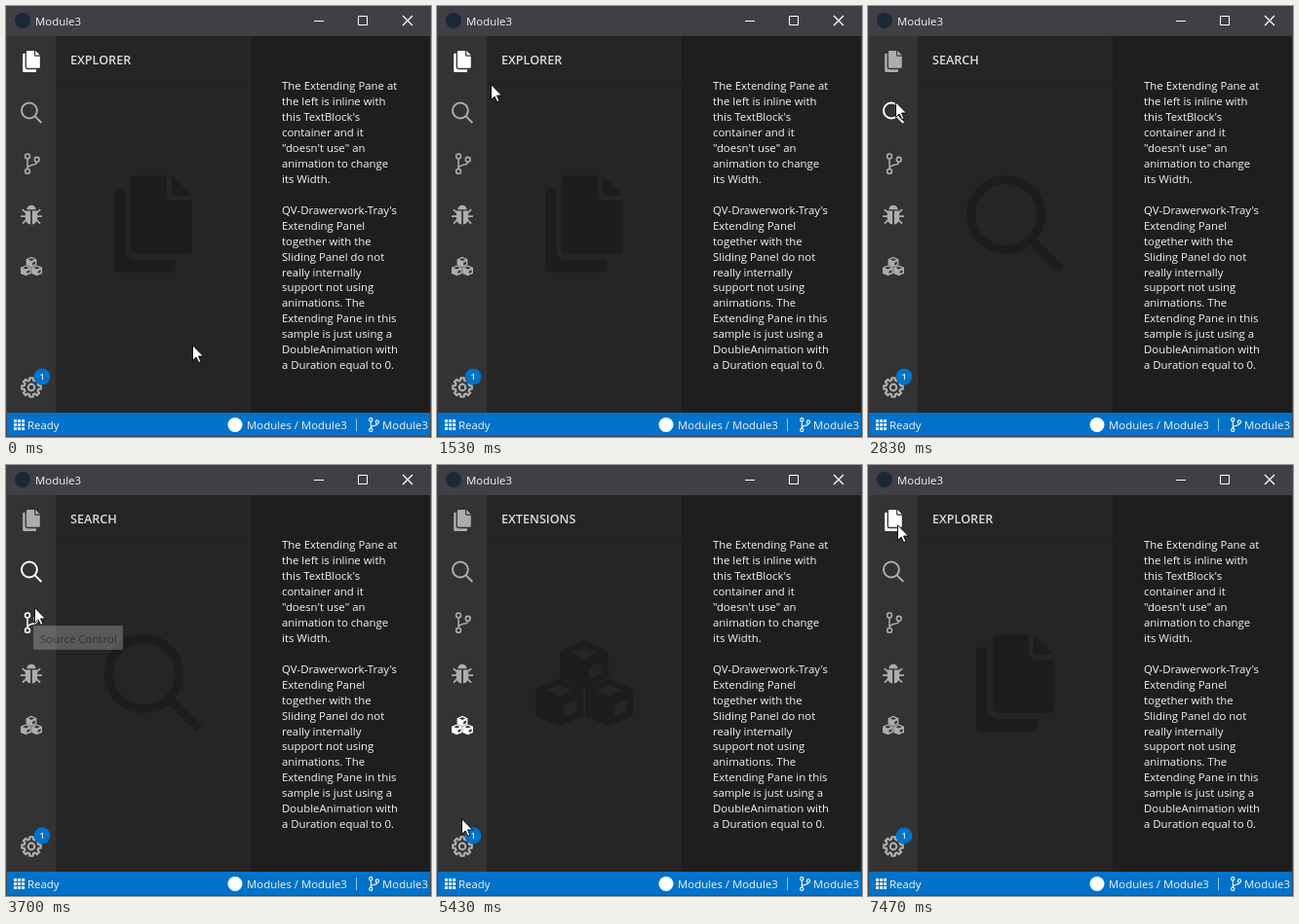
An HTML page for the animation above (8 s loop, 436x443 px).

```html
<!DOCTYPE html>
<html lang="en">
<head>
<meta charset="utf-8">
<title>Navigation pane</title>
<style>
  html, body { margin: 0; width: 100%; height: 100%; overflow: hidden; background: #1e1e1e; }
  svg { display: block; width: 436px; height: 443px; }
  text { font: 500 11.4px "Open Sans", "Noto Sans", sans-serif; fill: #f4f4f4; white-space: pre; }
  #title { font-weight: 600; font-size: 12.6px; fill: #dcdcdc; }
  .item { color: #adadad; }
  .item.lit { color: #fff; }
  .fill { fill: currentColor; fill-rule: evenodd; }
  .line { fill: none; stroke: currentColor; stroke-width: 8; stroke-linejoin: round; }
</style>
</head>
<body>
<svg viewBox="0 0 436 443">
  <defs>
    <linearGradient id="under" x2="0" y2="1"><stop stop-opacity=".14"/><stop offset="1" stop-opacity="0"/></linearGradient>

    <!-- icons share a 100 unit box -->
    <g id="files" class="fill">
      <path d="M10 18a5 5 0 0 1 5-5H21V76a11 11 0 0 0 11 11H73V95a5 5 0 0 1-5 5H15a5 5 0 0 1-5-5Z"/>
      <path d="M27 5a5 5 0 0 1 5-5H64V20a6 6 0 0 0 6 6H90V76a5 5 0 0 1-5 5H32a5 5 0 0 1-5-5Z"/>
      <path d="M69 0L90 21H73a4 4 0 0 1-4-4Z"/>
    </g>
    <g id="search" class="line" style="stroke-width:9">
      <circle cx="40.5" cy="40.5" r="36"/>
      <path d="M66 66L97 97"/>
    </g>
    <g id="branch" class="line" style="stroke-width:7">
      <circle cx="32" cy="15" r="11"/><circle cx="32" cy="85" r="11"/><circle cx="76" cy="30" r="11"/>
      <path d="M32 26V74M76 41C76 62 34 48 32 72"/>
    </g>
    <g id="bug">
      <path class="fill" d="M29 25a21 21 0 0 1 42 0ZM22 31H46V94C30 92 22 80 22 66ZM54 31H78V66C78 80 70 92 54 94Z"/>
      <path class="line" d="M26 40L8 24M74 40L92 24M24 56H0M76 56H100M27 72L9 90M73 72L91 90"/>
    </g>
    <path id="cube" class="fill" d="M0-24.5L24.5-14V14L0 24.5L-24.5 14V-14ZM0-18L14-12L0-6L-14-12ZM5 3L18-3V9L5 15Z"/>
    <g id="cubes">
      <use href="#cube" x="50" y="31"/><use href="#cube" x="24.5" y="70"/><use href="#cube" x="75.5" y="70"/>
    </g>
    <g id="gear" class="line" style="stroke-width:10"><path id="teeth"/><circle cx="50" cy="50" r="15"/></g>
  </defs>

  <rect width="436" height="443" fill="#1e1e1e"/>
  <rect width="436" height="31" fill="#403f46"/>
  <rect y="31" width="51" height="387" fill="#333"/>
  <rect x="51" y="31" width="200" height="387" fill="#252526"/>
  <rect x="51" y="78" width="200" height="3" fill="url(#under)"/>
  <rect y="418" width="436" height="25" fill="#0072c9"/>
  <path d="M.5 0V442.5H435.5V0" fill="none" stroke="#48474e"/>

  <circle cx="17" cy="15" r="8" fill="#172a35"/>
  <text x="30" y="20">Module3</text>
  <g fill="none" stroke="#fff">
    <path d="M316 15.5H326M361.5 10.5H370.5V19.5H361.5Z"/>
    <path d="M407 10L417 20M417 10L407 20" stroke-width="1.3"/>
  </g>

  <text id="title" x="66" y="60"></text>
  <use id="mark" transform="translate(101 174)" color="#1d1d1d"/>
  <g id="body"></g>
  <g id="items"></g>
  <circle cx="37" cy="381" r="8.4" fill="#0072c9"/>
  <text x="37" y="384.3" text-anchor="middle" style="font-size:9px;font-weight:600">1</text>

  <g id="dots" fill="#fff"></g>
  <text x="22" y="435">Ready</text>
  <circle cx="235" cy="430.5" r="7.5" fill="#fff"/>
  <text x="247" y="435">Modules / Module3</text>
  <path d="M359.5 424V437" stroke="#fff" stroke-opacity=".6"/>
  <use href="#branch" transform="translate(369.5 423) scale(.15)" color="#fff"/>
  <text x="386" y="435">Module3</text>

  <g id="tip" opacity="0">
    <rect x="28.5" y="165.5" width="91" height="24" fill="#f1f2f7" stroke="#ddd"/>
    <text x="35" y="183" style="fill:#444">Source Control</text>
  </g>
  <path id="cursor" d="M.5 .8V16.4L4.1 13L6.7 18.6L9 17.6L6.5 12H11.5Z" fill="#fff" stroke="#000" stroke-width=".9"/>
</svg>
<script>
const LOOP = 8000;
const START = { x: 191, y: 348 };

// each move glides from the last resting point
const MOVES = [
  { from: 30, to: 370, x: 214, y: 313 },
  { from: 770, to: 1570, x: 50, y: 73 },
  { from: 1570, to: 1900, x: 41, y: 66 },
  { from: 2070, to: 2470, x: 30, y: 88 },
  { from: 2470, to: 2640, x: 28, y: 111 },
  { from: 2720, to: 2870, x: 28, y: 94 },
  { from: 3170, to: 3300, x: 29, y: 146 },
  { from: 3960, to: 4230, x: 27, y: 224 },
  { from: 4600, to: 4870, x: 27, y: 263 },
  { from: 5130, to: 5530, x: 25, y: 388 },
  { from: 5900, to: 6270, x: 26, y: 135 },
  { from: 6270, to: 6670, x: 28, y: 49 },
  { from: 6740, to: 7030, x: 29, y: 60 },
  { from: 7440, to: 7470, x: 30, y: 61 }
];

// a click opens the item under the pointer
const CLICKS = [2670, 3920, 4590, 5120, 5890, 6730];
const TIP = { from: 3650, to: 3920, fade: 200 };

const ITEMS = ["files", "search", "branch", "bug", "cubes", "gear"];
const TITLES = ["EXPLORER", "SEARCH", "SOURCE CONTROL", "DEBUG", "EXTENSIONS", "SETTINGS"];
const itemY = i => ITEMS[i] === "gear" ? 392 : 57 + 52.6 * i;

const LINES = `The Extending Pane at
the left is inline with
this TextBlock's
container and it
"doesn't use" an
animation to change
its Width.

QV-Drawerwork-Tray's
Extending Panel
together with the
Sliding Panel do not
really internally
support not using
animations. The
Extending Pane in this
sample is just using a
DoubleAnimation with
a Duration equal to 0.`.split("\n");

const $ = id => document.getElementById(id);
const clamp = k => Math.min(1, Math.max(0, k));
const ease = k => (k + k * k * (3 - 2 * k)) / 2;

function add(parent, tag, attrs, text = "") {
  const el = document.createElementNS("http://www.w3.org/2000/svg", tag);
  for (const key in attrs) el.setAttribute(key, attrs[key]);
  el.textContent = text;
  return parent.appendChild(el);
}

function gearPath() {
  const points = [];
  for (let a = 0; a < 360; a += 45)
    for (const [turn, r] of [[-15, 34], [-10, 45], [10, 45], [15, 34]]) {
      const rad = (a + turn) * Math.PI / 180;
      points.push(`${50 + r * Math.sin(rad)} ${50 - r * Math.cos(rad)}`);
    }
  return "M" + points.join("L") + "Z";
}

$("teeth").setAttribute("d", gearPath());

LINES.forEach((line, i) => add($("body"), "text", { x: 283, y: 86 + i * 15.96 }, line));

for (let i = 0; i < 9; i++)
  add($("dots"), "rect", { x: 8 + i % 3 * 4, y: 425 + Math.floor(i / 3) * 4, width: 3, height: 3 });

const buttons = ITEMS.map((icon, i) =>
  add($("items"), "use", { href: "#" + icon, class: "item", transform: `translate(15 ${itemY(i) - 11}) scale(.22)` }));

function pointer(t) {
  let { x, y } = START;
  for (const move of MOVES) {
    const k = ease(clamp((t - move.from) / (move.to - move.from)));
    x += (move.x - x) * k;
    y += (move.y - y) * k;
  }
  return { x: Math.round(x), y: Math.round(y) };
}

function itemAt({ x, y }) {
  return x < 51 ? ITEMS.findIndex((_, i) => Math.abs(y - itemY(i)) < 26) : -1;
}

function openItem(t) {
  const last = CLICKS.filter(time => time <= t).pop();
  return last ? itemAt(pointer(last)) : 0;
}

function draw(t) {
  const at = pointer(t), hover = itemAt(at), open = openItem(t);
  $("cursor").setAttribute("transform", `translate(${at.x} ${at.y})`);
  $("tip").setAttribute("opacity", t < TIP.to ? clamp((t - TIP.from) / TIP.fade) : 0);
  buttons.forEach((b, i) => b.classList.toggle("lit", i === hover || i === open));
  $("title").textContent = TITLES[open];
  $("mark").setAttribute("href", "#" + ITEMS[open]);
}

const start = performance.now();
function tick() {
  draw((performance.now() - start) % LOOP);
  requestAnimationFrame(tick);
}
draw(0);
requestAnimationFrame(tick);
</script>
</body>
</html>
```
